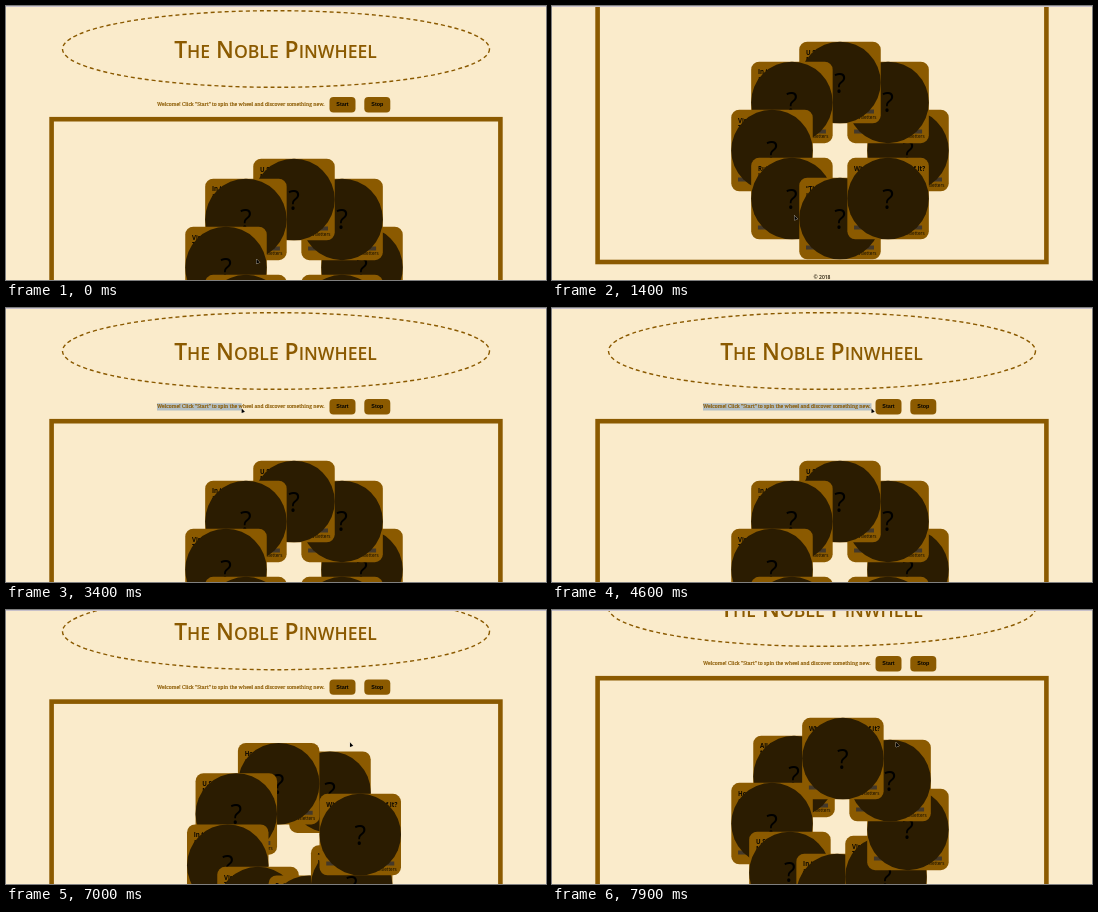
An HTML page with a canvas for the animation above (8000 ms loop, 540 by 274 pixels).

```html
<!DOCTYPE html>
<html lang="en">
<head>
<meta charset="utf-8">
<title>Spinning wheel</title>
<style>
  html, body { margin: 0; width: 100%; height: 100%; overflow: hidden; background: #faebcb; }
  canvas { display: block; }
</style>
</head>
<body>
<canvas id="stage" width="540" height="274"></canvas>
<script>
const ctx = document.getElementById('stage').getContext('2d');
const LOOP = 8000;
const CREAM = '#faebcb', BROWN = '#8b5a00', DARK = '#2b1c01', INK = '#0c0800';
const SANS = '"Open Sans", sans-serif';
const PAGE_SCROLL = 117, SPIN_SCROLL = 45;
const SELECT_START = 2900, SELECT_END = 4800;
const SPIN_START = 6300, SPIN_SPEED = 82.8;
const wheel = { x: 288, y: 261.5, radius: 68, card: 81.5 };
const intro = { x: 151, y: 100.4, width: 168.5 };

// In stacking order, counter-clockwise from the right.
const headlines = [
  ['All the Ways', 'to Be Idle'], ['How Far Can', 'a Snail Go?'],
  ['U.S. Rivers', 'Now Rising'], ['In the Woods', 'at Dawn'],
  ['Visit a Farm', 'This Fall'], ['Rules for a', 'Long Walk'],
  ['“The Moon', 'Is Closer”'], ['What If We Let Go of It?']
];

// Progress from 0 to 1 between two times; a power above 1 eases out.
function ramp(t, start, end, power = 1) {
  const k = Math.min(1, Math.max(0, (t - start) / (end - start)));
  return 1 - (1 - k) ** power;
}

const mix = (a, b, k) => a + (b - a) * k;

function scrollAt(t) {
  return PAGE_SCROLL * (ramp(t, 250, 1000) - ramp(t, 1600, 2000))
    + SPIN_SCROLL * ramp(t, 6350, 7900, 1.2);
}

const selectedWidth = t => intro.width * ramp(t, SELECT_START, 4600, 2);

function cursorAt(t) {
  const down = ramp(t, 500, 1000);
  const toText = ramp(t, 2200, SELECT_START);
  const toButton = ramp(t, 4900, 5700);
  const away = ramp(t, 6350, 6900);
  return {
    x: mix(mix(250.5, 242.5, down), intro.x, toText) + selectedWidth(t) + 21 * toButton + 3.5 * away,
    y: mix(mix(253, 209.5, down), intro.y, toText) - 3 * toButton + 35 * away
  };
}

function text(str, x, y, font, color, align = 'left') {
  ctx.font = font;
  ctx.fillStyle = color;
  ctx.textAlign = align;
  ctx.fillText(str, x, y);
}

function box(x, y, w, h, radius, color) {
  ctx.fillStyle = color;
  ctx.beginPath();
  ctx.roundRect(x, y, w, h, radius);
  ctx.fill();
}

function smallCaps(str, center, y, big, small) {
  const runs = str.split(/(?<=[A-Z])|(?= )|(?<= )/).map(s => ({
    s: s.toUpperCase(),
    font: `600 ${/[a-z]/.test(s) ? small : big}px ${SANS}`
  }));
  for (const run of runs) {
    ctx.font = run.font;
    run.width = ctx.measureText(run.s).width;
  }
  let x = center - runs.reduce((sum, run) => sum + run.width, 0) / 2;
  for (const run of runs) {
    text(run.s, x, y, run.font, BROWN);
    x += run.width;
  }
}

function drawButton(label, x) {
  box(x, 91, 26, 15.4, 4, BROWN);
  text(label, x + 13, intro.y, 'bold 5.4px "Liberation Sans", sans-serif', '#000', 'center');
}

function drawHeader(t) {
  ctx.strokeStyle = BROWN;
  ctx.lineWidth = 1.4;
  ctx.setLineDash([4, 3]);
  ctx.beginPath();
  ctx.ellipse(270, 43, 213.5, 38.3, 0, 0, Math.PI * 2);
  ctx.stroke();
  ctx.setLineDash([]);
  smallCaps('The Noble Pinwheel', 269.5, 52, 22.8, 17.6);

  if (t < SELECT_END) box(intro.x, 95.3, selectedWidth(t), 7.2, 0, '#b3bfc4');
  const welcome = 'Welcome! Click "Start" to spin the wheel and discover something new.';
  text(welcome, intro.x, intro.y, '5.05px "Noto Serif", serif', BROWN);
  ctx.lineWidth = 0.2;
  ctx.strokeText(welcome, intro.x, intro.y);
  drawButton('Start', 323.5);
  drawButton('Stop', 358.3);
}

function drawCard(lines, x, y) {
  const half = wheel.card / 2;
  ctx.save();
  ctx.translate(x, y);
  box(-half, -half, wheel.card, wheel.card, 8, BROWN);
  lines.forEach((line, i) => text(line, -34, -28 + i * 7, `bold 6.1px ${SANS}`, INK));
  box(-34, 27, 68, 4, 0, '#43382a');
  text('newsletters', 36.5, 36, `4.6px ${SANS}`, INK, 'right');
  ctx.fillStyle = DARK;
  ctx.beginPath();
  ctx.arc(0, 0, half, 0, Math.PI * 2);
  ctx.fill();
  text('?', 0, 10, `27px ${SANS}`, '#000', 'center');
  ctx.restore();
}

function drawWheel(t) {
  const turn = Math.max(0, t - SPIN_START) / 1000 * SPIN_SPEED;
  headlines.forEach((lines, i) => {
    const angle = (turn + i * 45) * Math.PI / 180;
    drawCard(lines, wheel.x + wheel.radius * Math.cos(angle), wheel.y - wheel.radius * Math.sin(angle));
  });
}

function drawCursor({ x, y }) {
  ctx.beginPath();
  ctx.moveTo(x, y);
  ctx.lineTo(x, y + 4.6);
  ctx.lineTo(x + 3.2, y + 3.4);
  ctx.closePath();
  ctx.strokeStyle = '#d8d2c6';
  ctx.lineWidth = 0.7;
  ctx.stroke();
  ctx.fillStyle = '#000';
  ctx.fill();
}

function draw(t) {
  ctx.fillStyle = CREAM;
  ctx.fillRect(0, 0, 540, 274);
  ctx.save();
  ctx.translate(0, -scrollAt(t));
  drawHeader(t);
  ctx.strokeStyle = BROWN;
  ctx.lineWidth = 4.6;
  ctx.strokeRect(45.6, 113.2, 448.8, 259.8);
  drawWheel(t);
  text('© 2018', 270, 390, `600 5px ${SANS}`, '#1a1200', 'center');
  ctx.restore();
  drawCursor(cursorAt(t));
  ctx.fillStyle = '#c6bfc9';
  ctx.fillRect(0, 0, 540, 1);
}

function tick() {
  draw(performance.now() % LOOP);
  requestAnimationFrame(tick);
}
tick();
</script>
</body>
</html>
```
